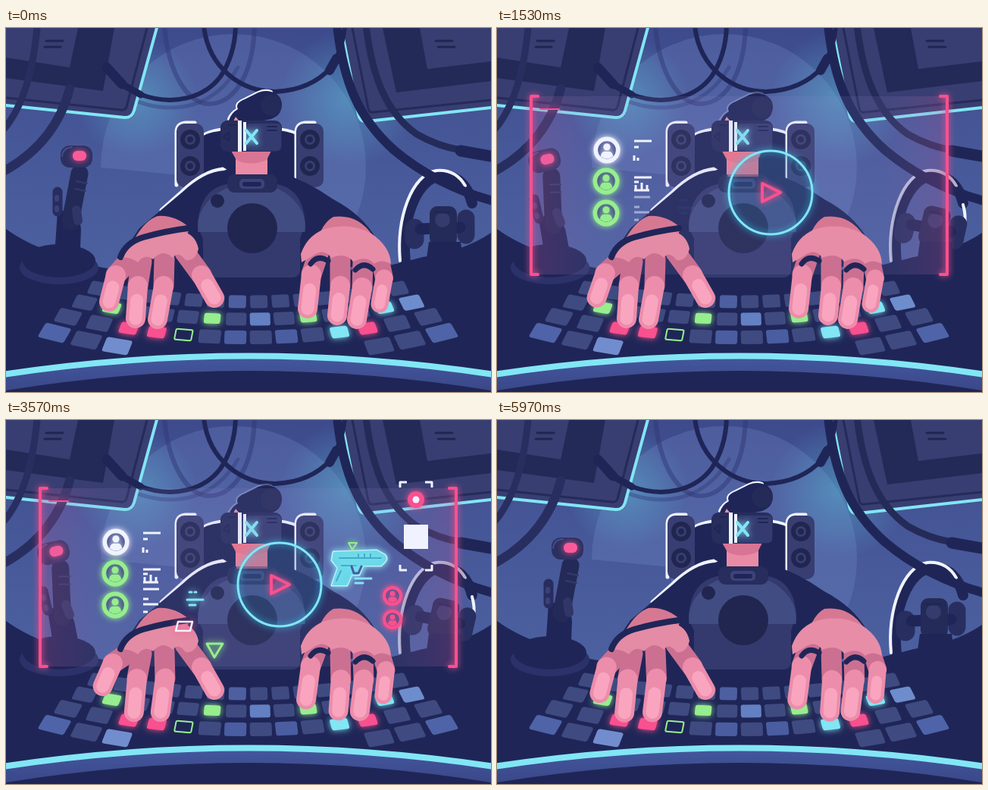
Write an HTML page with a canvas that moves like this. It is 640 by 480 pixels and loops after 6.01 s.

```html
<!DOCTYPE html>
<html lang="en">
<head>
<meta charset="utf-8">
<title>Cockpit</title>
<style>
html, body { margin: 0; width: 100%; height: 100%; overflow: hidden; background: #1f2654; }
canvas { display: block; width: 640px; height: 480px; }
</style>
</head>
<body>
<canvas id="stage" width="640" height="480"></canvas>
<script>
const ctx = document.getElementById('stage').getContext('2d');
const LOOP = 6010, TAP = LOOP / 9;
const INK = '#1f2657', NAVY = '#282f60', STEEL = '#383e72', CYAN = '#82e6f5',
  PINK = '#f9508f', GREEN = '#96ee8e', WHITE = '#f0f3ff';
let t = 0;

const ramp = (a, b, x = t) => {
  const k = Math.min(1, Math.max(0, (x - a) / (b - a)));
  return k * k * (3 - 2 * k);
};
const pulse = (a, b, c, d, x = t) => ramp(a, b, x) - ramp(c, d, x);
const mix = (a, b, k) => a + (b - a) * k;

function fill(d, color) {
  ctx.fillStyle = color;
  ctx.fill(new Path2D(d));
}
function line(d, color, width, cap = 'round') {
  ctx.strokeStyle = color;
  ctx.lineWidth = width;
  ctx.lineCap = cap;
  ctx.lineJoin = 'round';
  ctx.stroke(new Path2D(d));
}
function disc(x, y, rx, color, ry = rx) {
  ctx.fillStyle = color;
  ctx.beginPath();
  ctx.ellipse(x, y, rx, ry, 0, 0, 7);
  ctx.fill();
}
function box(x, y, w, h, r, color) {
  ctx.fillStyle = color;
  ctx.beginPath();
  ctx.roundRect(x, y, w, h, r);
  ctx.fill();
}
function group(draw, { x = 0, y = 0, turn = 0, scale = 1, alpha = 1, glow } = {}) {
  if (alpha <= 0 || scale <= 0) return;
  ctx.save();
  ctx.translate(x, y);
  ctx.rotate(turn);
  ctx.scale(scale, scale);
  ctx.globalAlpha *= alpha;
  if (glow) { ctx.shadowColor = glow; ctx.shadowBlur = 8; }
  draw();
  ctx.restore();
}
function haze(x, y, r, rgb, a) {
  const g = ctx.createRadialGradient(x, y, 0, x, y, r);
  g.addColorStop(0, `rgba(${rgb},${a})`);
  g.addColorStop(1, `rgba(${rgb},0)`);
  ctx.fillStyle = g;
  ctx.fillRect(x - r, y - r, 2 * r, 2 * r);
}

function room() {
  const g = ctx.createLinearGradient(0, 0, 0, 320);
  g.addColorStop(0, '#3d4a8c');
  g.addColorStop(.45, '#465798');
  g.addColorStop(1, '#4c609f');
  ctx.fillStyle = g;
  ctx.fillRect(0, 0, 640, 480);
  group(() => {
    ctx.clip(new Path2D('M0 0H640V320H230V194L0 172Z'));
    disc(300, 183, 175, 'rgba(120,145,205,.26)');
  });
  haze(172, 92, 80, '90,200,220', .4);
  haze(452, 92, 90, '90,200,220', .42);

  line('M209 -3C214 60 240 100 268 100S326 70 328 -3', 'rgba(48,56,118,.5)', 6);
  line('M176 98C225 114 275 104 306 52', 'rgba(48,56,118,.4)', 5);

  fill('M0 0H201L170 112Q168 120 158 119L0 102Z', STEEL);
  line('M200 -4L169 109Q166 119 156 118L0 102', CYAN, 4);
  line('M186 0L159 104Q157 109 151 108L0 92', '#252b59', 3);
  fill('M0 0H143L128 83L0 66Z', '#242a57');
  fill('M0 0H95L84 52L0 39Z', STEEL);
  fill('M442 0H640V106L478 124Q468 124 466 115Z', STEEL);
  line('M442 -2L465 114Q467 124 477 123L640 105', CYAN, 4);
  line('M457 0L478 106Q479 112 485 111L640 95', '#252b59', 3);
  fill('M497 0H640V70L515 85Z', '#242a57');
  fill('M546 0H640V44L556 54Z', STEEL);
  line('M53 17H75M51 25H72M567 17H589M570 25H592', '#20264f', 3);

  line('M41 0C35 65 20 108 -5 136', NAVY, 9);
  line('M84 80C70 133 36 168 -5 190', NAVY, 12);
  line('M176 87C220 104 262 92 283 64Q302 36 303 -3', INK, 6);
  line('M133 52L153 74', INK, 13);
  line('M153 74L178 88', INK, 9);
  line('M261 -3C267 54 312 84 355 84Q402 82 429 52Q444 30 447 -3', INK, 6);
  line('M427 56L436 40', INK, 12);
}

function speaker(x) {
  line(`M${x} 207V138Q${x} 126 ${x + 12} 125H${x + 24}`, WHITE, 5);
  box(x, 126, 36, 84, 10, STEEL);
  for (const y of [147, 182]) {
    disc(x + 18, y, 13, '#20264f');
    disc(x + 18, y, 7, STEEL);
    disc(x + 18, y, 4, '#20264f');
  }
}

function pilot() {
  line('M258 144Q264 137 286 134M362 134Q380 136 387 143', WHITE, 5);
  fill('M256 145Q265 137 290 135H360Q380 137 390 146V240H256Z', INK);
  speaker(225);
  speaker(383);

  line('M205 240L232 216Q260 189 286 186L297 193', WHITE, 5);
  fill('M148 306L176 264L232 217Q262 189 288 188L305 180H346L355 188Q395 200 432 226Q470 246 488 277L470 310L400 335H245Z', INK);
  fill('M253 258Q257 207 300 205H350Q392 208 395 258L388 276V318Q388 329 376 329H272Q260 329 260 318V275Z', '#343a6e');
  disc(324, 262, 71, '#414c82', 57);
  fill('M250 269H398V285H250Z', INK);
  fill('M256 269H391L388 278V318Q388 329 376 329H272Q260 329 260 318V278Z', '#343a6e');
  disc(325, 264, 33, '#20264f');
  disc(279, 228, 9, '#20264f');

  fill('M303 160H345V196H303Z', '#ea8ba6');
  fill('M297 162H350L344 174Q322 183 304 174Z', '#d97594');
  box(292, 193, 66, 24, 9, '#272d5c');
  box(308, 199, 33, 13, 5, '#3c437a');
  box(312, 203, 25, 6, 3, INK);

  const dip = pulse(350, 800, 5350, 5900);
  group(() => {
    group(() => line('M294 120Q297 112 306 107Q302 99 315 94L333 85Q342 81 350 84', WHITE, 4), { alpha: 1 - .75 * dip });
    fill('M294 122Q297 112 306 107Q302 99 315 94L333 85Q345 80 357 87Q366 94 363 105Q363 115 350 120L320 126Z', INK);
    disc(350, 102, 14, '#252b58');
  }, { y: 3 * dip });
  fill('M300 123L303 117L308 123Z', '#ea8ba6');
  box(283, 122, 81, 41, 9, '#272d5c');
  box(317, 126, 46, 36, 5, '#343b70');
  box(306, 122, 5, 41, 0, WHITE);
  box(313, 124, 4, 38, 0, WHITE);
  line('M294 138L287 143L294 149Z', INK, 2);
  line('M294 128H303M345 130H357M345 135H357', INK, 2);
  group(() => line('M317 135L331 152M331 135L317 152', CYAN, 4), { glow: CYAN });
}

function joystick(lean) {
  disc(70, 316, 52, '#2c3269', 22);
  disc(70, 307, 48, INK, 22);
  group(() => {
    fill('M-12 15L-7 -58L20 -62L24 -35L22 15Z', INK);
    line('M10 -45L22 -108', '#242a58', 23);
    line('M-7 -58V-84', '#272d5e', 13);
    line('M-8 -60V-63M-8 -74V-77', '#3a4178', 6);
    line('M20 -46L18 -60', '#303667', 12);
    box(-3, -145, 42, 29, 12, '#2b3061');
    line('M-1 -131Q0 -142 12 -143', '#454c86', 2);
    line('M16 -88L30 -85M18 -98L32 -95', '#343a6e', 2);
    group(() => box(13, -138, 18, 13, 6, '#fb5a98'), { glow: PINK });
  }, { x: 75, y: 300 + 6 * lean, turn: -.23 * lean });
}

function wheel(lean) {
  group(() => {
    line('M-46 45C-52 -10 -32 -66 4 -69Q34 -66 42 -32', INK, 14);
    group(() => line('M-53 44C-58 -12 -38 -70 -5 -75Q20 -77 33 -55', WHITE, 4), { alpha: 1 - .3 * lean });
    group(() => line('M42 -30Q46 -16 44 -4', WHITE, 4), { alpha: lean });
  }, { x: 573, y: 263 });
  group(() => {
    line('M-34 1V16', NAVY, 25);
    line('M34 -12V10', NAVY, 23);
    line('M-26 2L26 0', INK, 15);
    box(-14, -28, 36, 52, 10, '#252b58');
    disc(3, -10, 10, '#343b6d');
    line('M-6 -20H12', INK, 3);
  }, { x: 573, y: 263, turn: .22 * lean });
  fill('M558 282H600L608 340H550Z', INK);
}

function rightCables() {
  line('M437 -4C445 72 466 120 512 161Q568 208 646 229', INK, 12);
  line('M475 -4C483 65 502 112 542 140Q570 156 600 161', '#252b58', 9);
  line('M600 162L640 169', INK, 15);
}

// Each key row: middle y, curve, pitch, pitch growth, width, height.
const rows = [
  [361, .00045, 28.3, .05, 23, 17],
  [384, .00047, 31.5, .04, 27, 17],
  [408, .00048, 33.6, .07, 29, 18],
  [434, .00049, 37.6, .04, 34, 19]
];
const lit = {
  '1,1': GREEN, '1,5': GREEN, '1,9': GREEN, '1,12': CYAN,
  '2,2': PINK, '2,3': PINK, '2,10': CYAN, '2,11': PINK
};
const tint = {
  '1,13': '#6e8dcc', '1,7': '#6280c2', '0,6': '#4d5f9f', '2,6': '#4a5da0',
  '2,8': '#4a5da0', '3,2': '#718dce', '3,0': '#4f64a8', '3,13': '#4f64a8'
};
function keyboard() {
  rows.forEach(([y0, curve, pitch, grow, w, h], r) => {
    for (let i = 0; i < 14; i++) {
      if (r == 3 && i > 2 && i < 11) continue;
      const o = i - 6.5, dx = o * (pitch + grow * o * o), id = r + ',' + i;
      ctx.save();
      ctx.transform(1, -2 * curve * dx, .0023 * dx, 1, 319.5 + dx, y0 - curve * dx * dx);
      if (lit[id]) { ctx.shadowColor = lit[id]; ctx.shadowBlur = 9; }
      if (id == '2,4') {
        ctx.strokeStyle = GREEN;
        ctx.lineWidth = 2;
        ctx.beginPath();
        ctx.roundRect(-11, -7, 22, 14, 2);
        ctx.stroke();
      } else {
        const k = lit[id] ? .8 : 1;
        box(-w / 2 * k, -h / 2 * k, w * k, h * k, 3, lit[id] || tint[id] || '#3f4a81');
      }
      ctx.restore();
    }
  });
}

function bezel() {
  const g = ctx.createLinearGradient(0, 430, 0, 480);
  g.addColorStop(0, '#44589f');
  g.addColorStop(1, '#3a4788');
  fill('M0 456Q320 408 640 456V480H0Z', g);
  fill('M0 478Q320 426 640 478V480H0Z', INK);
  line('M-4 457Q320 408 644 457', CYAN, 8);
}

// root, bent joint, tip at rest and tip when lifted
function finger([ax, ay, bx, by, cx, cy, dx, dy], k, width = 27) {
  const x = mix(cx, dx, k), y = mix(cy, dy, k);
  const jx = bx + (x - cx) * .5, jy = by + (y - cy) * .5;
  line(`M${ax} ${ay}L${jx} ${jy}`, '#cc7092', width);
  line(`M${jx} ${jy}L${x} ${y}`, '#ec8dab', width - 1);
  line(`M${mix(jx, x, .45)} ${mix(jy, y, .45)}L${x} ${y}`, '#f9a5bf', width - 10);
}
function hands() {
  const ph = t % TAP / TAP;
  const early = pulse(.2, .4, .72, .98, ph),
    snap = pulse(.32, .4, .86, .98, ph),
    late = pulse(.3, .39, .91, 1, ph);

  fill('M172 274Q185 253 200 248Q222 246 242 263L236 285H165Z', '#d77893');
  finger([163, 306, 145, 326, 136, 361, 126, 349], early);
  finger([179, 308, 174, 340, 171, 383, 167, 387], late);
  finger([209, 305, 208, 340, 200, 384, 207, 386], late);
  finger([236, 296, 258, 326, 275, 356, 275, 356], 0);
  fill('M151 304Q157 282 184 276L232 268Q250 272 254 291Q250 308 237 306Q227 293 220 303Q207 290 194 305Q183 297 174 309Q161 300 151 304Z', '#e48ba5');
  line('M151 302Q158 283 181 276Q209 268 240 264', INK, 8);

  fill('M410 284Q416 258 432 249Q465 245 484 274L476 290Z', '#d77893');
  finger([493, 302, 499, 330, 493, 364, 502, 362], late, 24);
  finger([471, 308, 470, 342, 463, 384, 477, 384], snap);
  finger([441, 302, 441, 340, 437, 379, 440, 387], late);
  finger([414, 292, 403, 325, 398, 370, 391, 365], snap);
  fill('M389 298Q397 275 418 266Q452 255 482 271Q507 288 508 311Q494 304 486 311Q476 299 458 308Q448 295 429 303Q420 289 404 301L390 309Z', '#e78da8');
  line('M402 311Q411 298 425 307M461 319Q472 307 484 318', INK, 7);
}

const shown = (start, span = 260) => pulse(start, start + span, 4080, 4380);

function user(x, y, r, color, start) {
  group(() => {
    disc(0, 0, 17, color);
    disc(0, 0, 11.5, '#4b548e');
    disc(0, -4, 4.5, color);
    fill('M-8 8Q-7 0 0 2Q7 0 8 8Q0 14 -8 8Z', color);
  }, { x, y, scale: r / 17 * shown(start), glow: color });
}

function hudGlass() {
  group(() => {
    const g = ctx.createLinearGradient(45, 0, 595, 0);
    g.addColorStop(0, 'rgba(215,90,160,.22)');
    g.addColorStop(.15, 'rgba(150,140,210,.12)');
    g.addColorStop(.85, 'rgba(150,140,210,.12)');
    g.addColorStop(1, 'rgba(215,90,160,.22)');
    ctx.fillStyle = g;
    ctx.fillRect(45, 90, 550, 235);
    fill('M297 163H345V196H304V176Z', 'rgba(240,120,140,.55)');
  }, { alpha: shown(350) });
}

function hud() {
  const base = shown(350);
  group(() => {
    const h = 117 * base, a = 207 - h, b = 207 + h;
    line(`M54 ${a}H45V${b + 1}H54M585 ${a}H594V${b + 1}H585`, PINK, 4);
    line('M57 107H82', PINK, 2);
  }, { alpha: base, glow: PINK });

  const ring = shown(600, 430);
  group(() => {
    disc(0, 0, 55, 'rgba(45,45,100,.12)');
    line('M-55 0A55 55 0 1 1 55 0A55 55 0 1 1 -55 0', CYAN, 3);
  }, { x: 361, y: 217, scale: ring, alpha: ring, glow: '#36c8ee' });
  group(() => line('M-11 -12L13 0L-11 12Z', PINK, 4, 'butt'),
    { x: 361, y: 217, turn: -1.2 * (1 - ring), scale: ring, glow: PINK });

  user(145, 161, 17.5, WHITE, 770);
  user(144, 202, 17.5, GREEN, 1000);
  user(144, 244, 17.5, GREEN, 1200);
  group(() => line('M181 149H204M181 157H187M181 168V175M186 171V175', WHITE, 3, 'butt'), { alpha: shown(1050) });
  group(() => line('M181 197H204M181 203H187M181 214H201M183 207V214M191 204V214M198 207V214', WHITE, 3, 'butt'), { alpha: shown(1250) });
  group(() => line('M181 223H202M181 236H188M181 243H201M181 253H187', WHITE, 3, 'butt'), { alpha: shown(1400) });
  group(() => line('M242 227H245M249 227H251M239 237H260M242 244H250', CYAN, 3), { alpha: shown(1500), glow: CYAN });
  group(() => line('M-8 -6H11L8 6H-11Z', WHITE, 2.5), { x: 235, y: 272, scale: shown(1600), glow: PINK });
  const marker = shown(1850, 420);
  group(() => line('M-10 -8H11L0 10Z', GREEN, 3),
    { x: 275, y: 303 + 10 * (1 - marker), turn: -.7 * (1 - marker), scale: shown(1850), glow: GREEN });

  const gun = shown(1750, 500);
  group(() => {
    const shape = 'M-33 -21L24 -23L35 -17Q39 -12 35 -8L30 -3H6L1 9H-9L-15 23H-35L-27 0L-35 -10Z';
    line(shape, WHITE, 3);
    fill(shape, '#6bd8e9');
    line('M-25 -13H30M-22 -3H-3M-23 4L-29 17M0 -18V-13M8 -18V-13M16 -18V-13', '#45abc7', 2);
    line('M-9 -2L-6 7H0L4 -2', '#455da0', 3);
  }, { x: 465, y: 195, turn: -.25 * (1 - gun), scale: mix(.8, 1, gun), alpha: gun, glow: CYAN });
  group(() => line('M461 209H482M461 215H471', CYAN, 3), { alpha: gun });
  group(() => line('M452 162H463L457 171Z', GREEN, 2), { alpha: shown(1700), glow: GREEN });
  user(510, 232, 13, PINK, 1650);
  user(510, 263, 13 + 2.5 * pulse(1950, 2080, 2160, 2350), PINK, 1800);

  const frame = shown(1980, 400);
  group(() => {
    const a = mix(103, 82, frame), b = mix(178, 198, frame);
    line(`M520 ${a + 7}V${a}H529M553 ${a}H562V${a + 7}M520 ${b - 7}V${b}H529M553 ${b}H562V${b - 7}`, WHITE, 3, 'butt');
    box(525, 138, 32, 32, 0, WHITE);
  }, { alpha: shown(1900, 200) });
  group(() => {
    disc(0, 0, 11, PINK);
    disc(0, 0, 4.5, WHITE);
  }, { x: 541, y: 105, scale: shown(2050, 320), glow: PINK });
}

function draw() {
  const lean = pulse(250, 750, 4050, 4480) - .5 * pulse(2450, 2680, 2720, 3050);
  room();
  fill('M0 265Q30 287 75 300Q110 315 148 319H475Q510 313 550 302Q605 294 640 270V480H0Z', INK);
  pilot();
  joystick(lean);
  wheel(lean);
  rightCables();
  keyboard();
  hudGlass();
  hands();
  hud();
  bezel();
}

const start = performance.now();
function tick() {
  t = (performance.now() - start) % LOOP;
  draw();
  requestAnimationFrame(tick);
}
tick();
</script>
</body>
</html>
```
